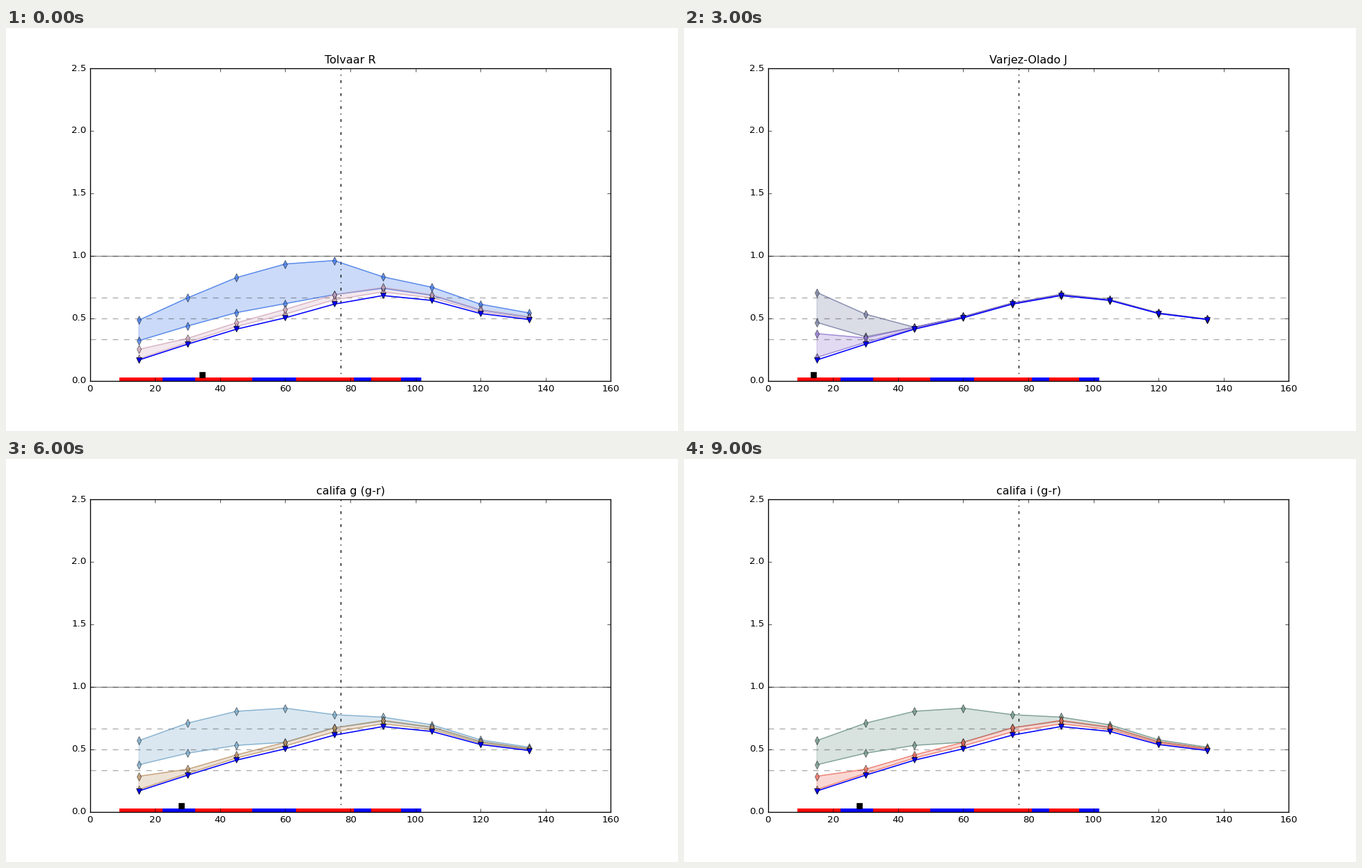
These frames come from a looping animation (966 by 580 pixels, 10000 ms). A matplotlib script:

```python
import numpy as np
import matplotlib.pyplot as plt
from matplotlib.animation import FuncAnimation

plt.style.use("classic")
plt.rcParams.update({"font.family": "DejaVu Sans", "font.size": 10,
                     "savefig.dpi": "figure", "savefig.facecolor": "white"})

DPI = 96
RADII = np.arange(15, 136, 15)
GAS = np.array([.165, .292, .412, .503, .612, .681, .642, .537, .489])
LIMIT = 77          # radius beyond which gas dominates

# Stellar disc: scale length and relative strength
TOLVAAR = (34.4, 1)
VARJEZ = (14, 2.65)
Y1991 = (42.9, .762)
Y1998 = (40.6, .818)
CALIFA = (28, 1.29)

# Title, disc, wide band colour, narrow band colour
SLIDES = [
    ("Tolvaar R", TOLVAAR, "#336fe7", "#d0a5b9"),
    ("Tolvaar B", TOLVAAR, "#4f9a8c", "#c98a4b"),
    ("Tolvaar R_max", TOLVAAR, "#8343bf", "#b33333"),
    ("Varjez-Olado J", VARJEZ, "#6f779f", "#8b6fcf"),
    ("1991 R", Y1991, "#ff4078", "#dcf387"),
    ("1998 V", Y1998, "#afd383", "#47eb47"),
    ("califa g (g-r)", CALIFA, "#6fa3c7", "#b98f5f"),
    ("califa g (r-i)", CALIFA, "#a367eb", "#a77797"),
    ("califa r (g-r)", CALIFA, "#8f9f57", "#c77fb3"),
    ("califa i (g-r)", CALIFA, "#678f83", "#eb6757"),
]


def bands(scale, strength):
    """Low and high edges of the wide band, then of the narrow band."""
    u = RADII / 15
    log_s = np.log(strength)
    stars = strength * np.exp(-1.135 + .8665 * u - .0475 * u**2
                              - .94 * RADII / scale)
    # The narrow excess is a broad hump plus a steep central rise.
    hump = (.076 - .07 * log_s) / (1 + ((RADII - 74) / 38)**2)
    centre = (.063 + .15 * log_s) * np.exp((15 - RADII) / 10)
    excess = hump + centre
    narrow_high = GAS + excess
    narrow_low = GAS + .45 * (1 - np.exp(-(RADII / 30)**2)) * excess

    inner = RADII < LIMIT
    outer = GAS + .15 * strength**-2.7 * np.exp((90 - RADII) / 43)
    wide_high = np.where(inner, np.maximum(stars, narrow_high), outer)
    wide_low = np.where(inner, np.maximum(stars / 1.515, narrow_high),
                        GAS + .9 * excess)
    return (wide_low, wide_high), (narrow_low, narrow_high)


class Band:
    """A filled strip with marked lines along both edges."""

    def __init__(self):
        self.fill = ax.fill([0, 1, 1], [0, 0, 1], alpha=.25, lw=1)[0]
        self.edges = [ax.plot(RADII, GAS, "d-", alpha=.7, lw=1.1, ms=6,
                              mec="k", mew=.5)[0] for _ in range(2)]

    def update(self, low, high, color):
        x = np.concatenate([RADII, RADII[::-1]])
        y = np.concatenate([low, high[::-1]])
        self.fill.set_xy(np.column_stack([x, y]))
        self.fill.set_color(color)
        for line, values in zip(self.edges, (low, high)):
            line.set_ydata(values)
            line.set_color(color)


fig = plt.figure(figsize=(966 / DPI, 580 / DPI), dpi=DPI, facecolor="white")
ax = fig.add_axes([.125, .125, .775, .775])
ax.set_xlim(0, 160)
ax.set_ylim(0, 2.5)
title = ax.set_title("", fontsize=12)

# Reference levels
ax.axhline(1, color="k", alpha=.45)
for level in (1 / 3, 1 / 2, 2 / 3, 1):
    ax.axhline(level, color="k", alpha=.33, ls="--")
ax.axvline(LIMIT, color="k", ls="-.")

wide, narrow = Band(), Band()
ax.plot(RADII, GAS, "v-", color="b", lw=1.2, ms=6, mec="k", mew=.5)

# Alternating intervals along the bottom
bounds = [9, 22.3, 32.4, 49.8, 63.4, 81.1, 86.5, 95.5, 101.7]
for i, (a, b) in enumerate(zip(bounds, bounds[1:])):
    ax.plot([a, b], [0, 0], color="rb"[i % 2], lw=7.5, solid_capstyle="butt")
scale_mark, = ax.plot([0], [.05], "ks", ms=6, mew=.5)


def draw(frame):
    name, disc, wide_color, narrow_color = SLIDES[frame]
    wide_edges, narrow_edges = bands(*disc)
    title.set_text(name)
    wide.update(*wide_edges, wide_color)
    narrow.update(*narrow_edges, narrow_color)
    scale_mark.set_xdata([disc[0]])
    return []


anim = FuncAnimation(fig, draw, frames=len(SLIDES), interval=1000,
                     init_func=lambda: draw(0), repeat=True, repeat_delay=0)
plt.show()
```
